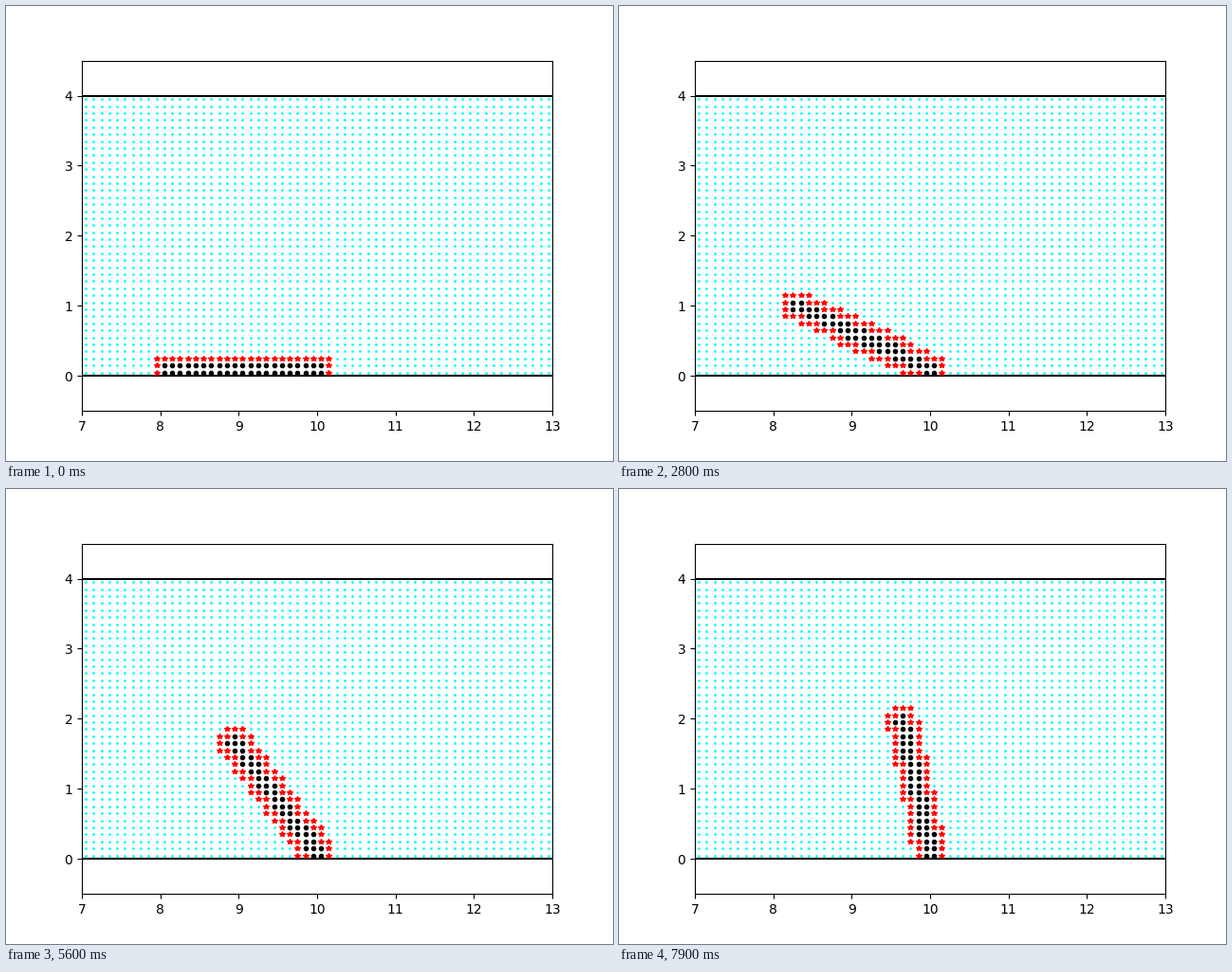
Write a matplotlib script that moves like this. It is 640x480 px and loops after 8000 ms.

```python
import numpy as np
import matplotlib.pyplot as plt
from matplotlib.animation import FuncAnimation

FRAMES, INTERVAL = 80, 100
STEP = 0.1                      # cell size
PIVOT = (10.0, 0.1)
LENGTH, HALF = 2.0, 0.1         # flap length and half thickness

xs = 7 + STEP * (np.arange(60) + 0.5)
ys = STEP * (np.arange(40) + 0.5)
X, Y = np.meshgrid(xs, ys)


def flap_mask(degrees):
    """Cells covered by the flap, raised by the given angle about its hinge."""
    a = np.radians(degrees)
    dx, dy = PIVOT[0] - X, Y - PIVOT[1]
    along = dx * np.cos(a) + dy * np.sin(a)
    across = dy * np.cos(a) - dx * np.sin(a)
    bar = (along >= 0) & (along <= LENGTH) & (np.abs(across) <= HALF)
    return bar | (np.hypot(dx, dy) <= HALF)


def rim_mask(solid):
    """Free cells that touch the solid, diagonals included."""
    rows, cols = solid.shape
    pad = np.pad(solid, 1)
    near = np.zeros_like(solid)
    for i in range(3):
        for j in range(3):
            near |= pad[i:i + rows, j:j + cols]
    return near & ~solid


fig, ax = plt.subplots(figsize=(6.4, 4.8), dpi=100)
ax.set_xlim(7, 13)
ax.set_ylim(-0.5, 4.5)
for wall in (0, 4):
    ax.plot([7, 13], [wall, wall], "k-", lw=1.5)

fluid, = ax.plot([], [], "o", color="cyan", ms=1)
body, = ax.plot([], [], "ko", ms=3)
rim, = ax.plot([], [], "r*", ms=4)


def update(frame):
    solid = flap_mask(frame)    # one degree per frame
    edge = rim_mask(solid)
    for line, mask in ((fluid, ~solid & ~edge), (body, solid), (rim, edge)):
        line.set_data(X[mask], Y[mask])
    return fluid, body, rim


anim = FuncAnimation(fig, update, frames=FRAMES, interval=INTERVAL,
                     repeat=True, repeat_delay=0)
plt.show()
```
